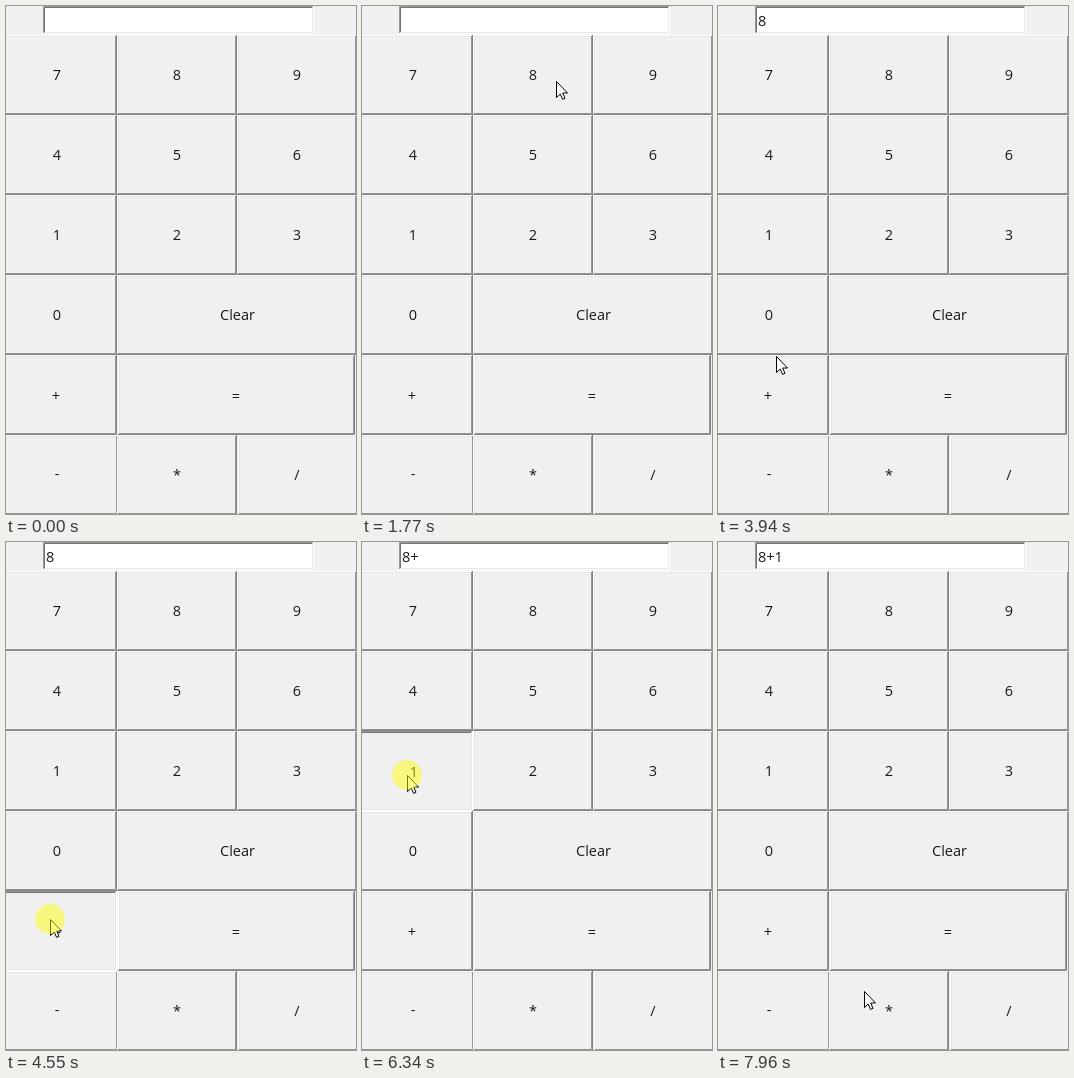
An HTML page for the animation above (8 s loop, 350 by 508 pixels).

```html
<!DOCTYPE html>
<html lang="en">
<head>
<meta charset="utf-8">
<title>Calculator</title>
<style>
  html, body { margin: 0; width: 100%; height: 100%; overflow: hidden; background: #f0f0f0; }
  svg { display: block; width: 350px; height: 508px; }
  text { font: 500 14.5px "Open Sans", "Noto Sans", sans-serif; fill: #1c1818; }
  .key text { text-anchor: middle; }
  .sunken { display: none; }
  .down .sunken { display: inline; }
  .down .raised { display: none; }
  .down text { transform: translate(1px, 1px); }
</style>
</head>
<body>
<svg id="stage" viewBox="0 0 350 508">
  <rect width="350" height="508" fill="#f0f0f0"/>
  <g id="keys"></g>
  <rect x="37" width="271" height="28" fill="#fff"/>
  <g id="entry"></g>
  <text id="value" x="40" y="20"></text>
  <path id="cursor" d="M.5.5V16.5L4.2 13 6.6 18.4 9 17.4 6.7 12H11.5Z" fill="#fff" stroke="#000"/>
  <circle id="glow" r="15" fill="#ff0" opacity=".47"/>
</svg>
<script>
const LOOP = 8000;
const RAISED = ['#fff', '#e6e6e6', '#808080', '#959595'];
const SUNKEN = ['#959595', '#757575', '#fff', '#e6e6e6'];
const $ = id => document.getElementById(id);

// Two-pixel bevel: outer and inner top-left edges, then outer and inner bottom-right edges.
function bevel(x, y, w, h, [tl, tl2, br, br2], cls) {
  const corner = (d, c) => `<path d="${d}" fill="none" stroke="${c}"/>`;
  const l = x + .5, t = y + .5, r = x + w - .5, b = y + h - .5;
  return `<g class="${cls}">` +
    corner(`M${l} ${b}V${t}H${r}`, tl) +
    corner(`M${l + 1} ${b - 1}V${t + 1}H${r - 1}`, tl2) +
    corner(`M${x} ${b}H${r}V${y}`, br) +
    corner(`M${x + 1} ${b - 1}H${r - 1}V${y + 1}`, br2) + '</g>';
}

// label, left, top, width, label centre, baseline offset
const keys = [
  ['7', -9, 29, 120, 51, 45], ['8', 111, 29, 120, 171, 45], ['9', 231, 29, 120, 291, 45],
  ['4', -9, 109, 120, 51, 45], ['5', 111, 109, 120, 171, 45], ['6', 231, 109, 120, 291, 45],
  ['1', -9, 189, 120, 51, 45], ['2', 111, 189, 120, 171, 45], ['3', 231, 189, 120, 291, 45],
  ['0', -9, 269, 120, 51, 45], ['Clear', 111, 269, 240, 231.5, 45],
  ['+', -9, 349, 120, 50, 46], ['=', 112, 349, 237, 230, 46],
  ['-', -9, 429, 121, 51, 44], ['*', 111, 429, 120, 171, 45], ['/', 232, 429, 120, 291, 45]
];
$('keys').innerHTML = keys.map(([label, x, y, w, cx, dy]) =>
  `<g class="key" data-key="${label}">` +
  bevel(x, y, w, 80, RAISED, 'raised') + bevel(x, y, w, 80, SUNKEN, 'sunken') +
  `<text x="${cx}" y="${y + dy}">${label}</text></g>`).join('');
$('entry').innerHTML = bevel(37, 0, 271, 28, SUNKEN, '');

// start, end, steps, ease-out power, from x, y, to x, y, sideways bend
const moves = [
  [930, 1770, 12, 1.77, 307, 492, 194, 75, 1],
  [3410, 4180, 11, 1.95, 175, 117, 46, 375, 1],
  [4240, 4320, 2, 1, 45, 376, 44, 377, 1],
  [5250, 5790, 8, 1.5, 43, 357, 45, 233, 1],
  [7270, 7960, 10, 1.1, 43, 241, 146, 449, 1.4]
];
const presses = [['8', 2700, 2780], ['+', 4470, 4620], ['1', 6340, 6410]];
const groups = presses.map(([label]) => document.querySelector(`[data-key="${label}"]`));

function pointer(t) {
  const move = moves.filter(m => t >= m[0]).pop();
  if (!move) return null;
  const [t0, t1, steps, power, x0, y0, x1, y1, bend] = move;
  const n = steps - 1;
  const k = Math.min(n, Math.floor((t - t0) / (t1 - t0) * n + .15)) / n;
  const e = 1 - (1 - k) ** power;
  return [Math.round(x0 + (x1 - x0) * e ** bend), Math.round(y0 + (y1 - y0) * e)];
}

function draw(now) {
  const t = now % LOOP;
  const at = pointer(t);
  let value = '', held = false;
  presses.forEach(([label, down, up], i) => {
    const on = t >= down && t < up;
    groups[i].classList.toggle('down', on);
    held = held || on;
    if (t >= up) value += label;
  });
  $('value').textContent = value;
  $('cursor').style.display = at ? '' : 'none';
  $('glow').style.display = held ? '' : 'none';
  if (at) for (const id of ['cursor', 'glow']) $(id).setAttribute('transform', `translate(${at})`);
}

const start = performance.now();
function tick() {
  draw(performance.now() - start);
  requestAnimationFrame(tick);
}
tick();
</script>
</body>
</html>
```
